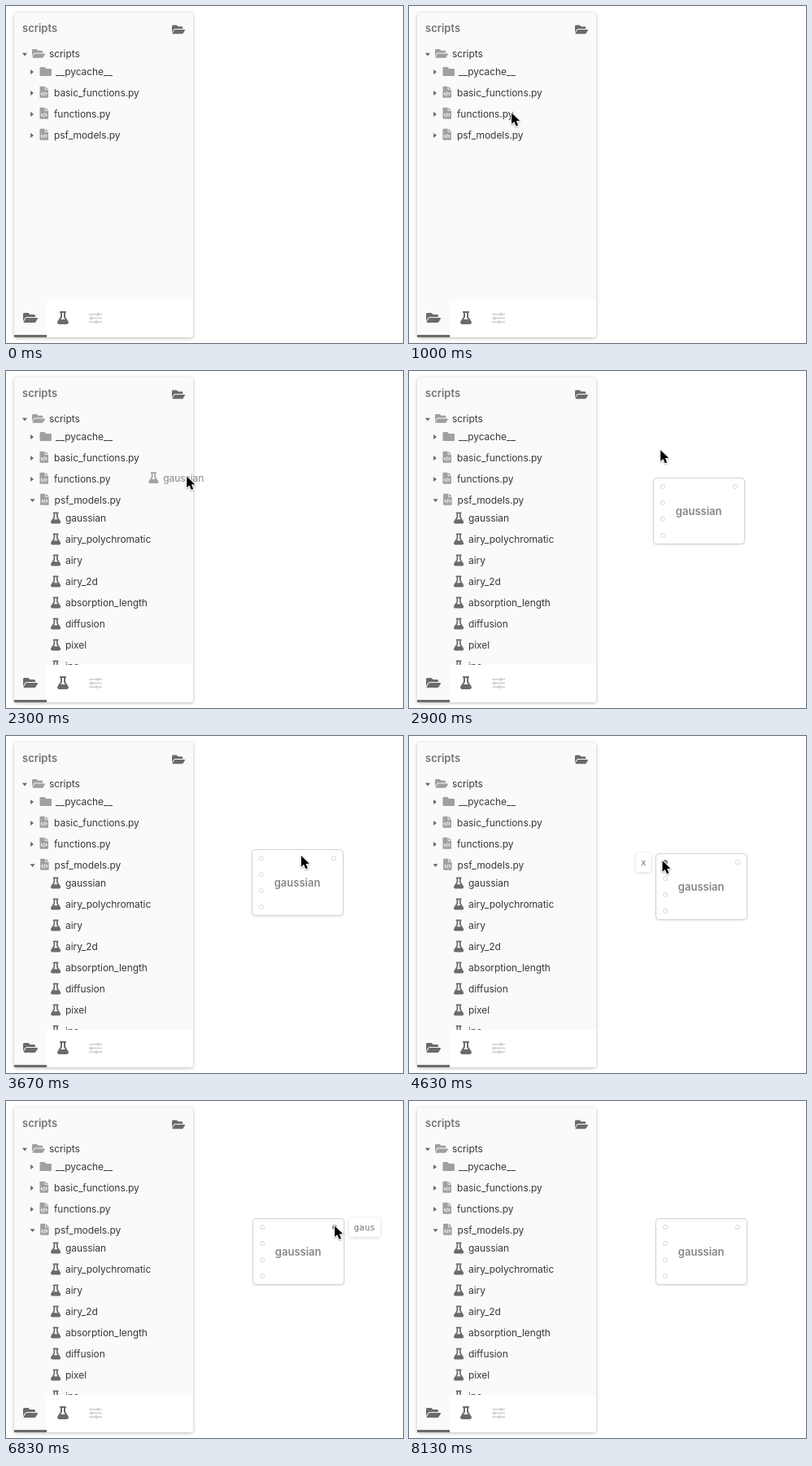
An HTML page with a canvas for the animation above (9030 ms loop, 488 px wide and 414 px high).

```html
<!DOCTYPE html>
<html lang="en">
<head>
<meta charset="utf-8">
<title>Script browser</title>
<style>
html, body { margin: 0; width: 100%; height: 100%; overflow: hidden; background: #fff; }
canvas { display: block; width: 488px; height: 414px; }
</style>
</head>
<body>
<canvas id="stage"></canvas>
<script>
const W = 488, H = 414, LOOP = 9030;
const canvas = document.getElementById('stage');
const ctx = canvas.getContext('2d');
const dpr = window.devicePixelRatio || 1;
canvas.width = W * dpr;
canvas.height = H * dpr;

const SANS = 'Inter, "Open Sans", sans-serif';
const MONO = '"DejaVu Sans Mono", monospace';
const DARK = '#6b6b6b', SOFT = '#a0a0a0', TEXT = '#383838', PANEL = '#fafafa';

const icons = {
  open: new Path2D('M573 292 500 416Q482 448 445 448H45C26 448 15 428 24 412L97 288Q115 256 152 256H552C570 256 582 276 573 292ZM152 224H480V176Q480 128 432 128H272L208 64H48Q0 64 0 112V390L69 272Q98 224 152 224Z'),
  folder: new Path2D('M464 128H272L208 64H48Q0 64 0 112V400Q0 448 48 448H464Q512 448 512 400V176Q512 128 464 128Z'),
  file: new Path2D('M0 24Q0 0 24 0H224V136Q224 160 248 160H384V488Q384 512 360 512H24Q0 512 0 488ZM256 0 384 128H256Z'),
  code: new Path2D('M125 270 65 335 125 400M259 270 319 335 259 400M217 245 167 425'),
  flask: new Path2D('M437 403 320 215V64H328Q352 64 352 40V24Q352 0 328 0H120Q96 0 96 24V40Q96 64 120 64H128V215L11 403C-18 450 16 512 72 512H376C432 512 466 450 437 403ZM138 320 186 242Q192 233 192 222V64H256V222Q256 233 262 242L310 320Z')
};
const arrow = new Path2D('M0 0V13.6L3.2 10.8 5.5 16.2 8 15.2 5.7 9.9 10 9.6Z');

// Pointer path: time, x, y
const path = [
  [440, 284, 0], [1100, 100, 153],
  [1600, 100, 153], [1870, 102, 179],
  [2040, 102, 179], [2070, 115, 177], [2500, 296, 97],
  [2870, 296, 97], [2900, 309, 97], [3300, 361, 139],
  [3540, 361, 139], [3770, 364, 152],
  [3940, 364, 152], [4330, 311, 153],
  [4600, 311, 153], [4630, 311.5, 153], [4830, 313, 174],
  [5040, 313, 174], [5370, 314, 197],
  [5540, 314, 197], [5770, 314, 212.5],
  [6140, 314, 212.5], [6830, 404, 153.5],
  [7400, 404, 153.5], [7730, 447, 82]
];
const EXPAND = 1330, GRAB = 2085, DROP = 2500;
const items = ['gaussian', 'airy_polychromatic', 'airy', 'airy_2d', 'absorption_length', 'diffusion', 'pixel', 'ipc'];
const ports = [
  [12, 11, 'x'], [12, 31, 'A'], [12, 51, 'mu'], [12, 71, 'sigma'], [101, 11, 'gaus']
];

function ease(p) {
  return p + 0.12 * Math.sin(Math.PI * p) * (1 - p);
}

function progress(t, a, b) {
  return ease(Math.min(1, Math.max(0, (t - a) / (b - a))));
}

function pointerAt(t) {
  if (t < 470 || t >= 8130) return null;
  if (t >= 8100) return { x: 420, y: 41 };
  let i = 0;
  while (i < path.length - 2 && t > path[i + 1][0]) i++;
  const [t0, x0, y0] = path[i], [t1, x1, y1] = path[i + 1];
  const p = progress(t, t0, t1);
  return { x: x0 + (x1 - x0) * p, y: y0 + (y1 - y0) * p };
}

function text(str, x, y, font, color, align = 'left') {
  ctx.font = font;
  ctx.fillStyle = color;
  ctx.textAlign = align;
  ctx.fillText(str, x, y);
}

function row(str, x, y) {
  ctx.letterSpacing = '-0.07px';
  text(str, x, y, '12px ' + SANS, TEXT);
  ctx.letterSpacing = '0px';
}

function icon(name, x, y, scale, color) {
  ctx.save();
  ctx.translate(x, y);
  ctx.scale(scale, scale);
  ctx.fillStyle = color;
  ctx.fill(icons[name], 'evenodd');
  if (name === 'file') {
    ctx.strokeStyle = PANEL;
    ctx.lineWidth = 38;
    ctx.stroke(icons.code);
  }
  ctx.restore();
}

function caret(x, y, down) {
  ctx.save();
  ctx.translate(x, y);
  if (down) ctx.rotate(Math.PI / 2);
  ctx.fillStyle = '#666';
  ctx.beginPath();
  ctx.moveTo(-1.8, -3);
  ctx.lineTo(2, 0);
  ctx.lineTo(-1.8, 3);
  ctx.fill();
  ctx.restore();
}

function card(x, y, w, h, r, fill, shade, blur) {
  ctx.save();
  ctx.shadowColor = `rgba(0,0,0,${shade})`;
  ctx.shadowBlur = blur * dpr;
  ctx.shadowOffsetY = dpr;
  ctx.fillStyle = fill;
  ctx.beginPath();
  ctx.roundRect(x, y, w, h, r);
  ctx.fill();
  ctx.restore();
}

function item(str, x, y) {
  icon('flask', x, y - 11.5, 14 / 512, DARK);
  row(str, x + 18, y);
}

function tree(t) {
  const open = t >= EXPAND;
  ctx.save();
  ctx.beginPath();
  ctx.rect(10, 8, 220, 353);
  ctx.clip();
  caret(23, 59.5, true);
  icon('open', 32, 51.3, 16 / 576, SOFT);
  row('scripts', 53, 63);
  caret(32, 81, false);
  icon('folder', 41.5, 73.3, 14.5 / 512, SOFT);
  row('__pycache__', 61, 85);
  ['basic_functions.py', 'functions.py', 'psf_models.py'].forEach((name, i) => {
    const y = 111 + i * 26, shown = open && i === 2, dx = shown ? 0.6 : 0;
    caret(32 + dx, y - 4, shown);
    icon('file', 41.5 + dx, y - 12.3, 14 / 512, SOFT);
    row(name, 59 + dx, y);
  });
  if (open) items.forEach((name, i) => item(name, 55, 185 + i * 26));
  ctx.restore();
}

function footer() {
  ctx.fillStyle = '#fff';
  ctx.beginPath();
  ctx.roundRect(50, 361, 180, 46, [0, 0, 4, 0]);
  ctx.fill();
  ctx.fillStyle = DARK;
  ctx.fillRect(10, 404, 40, 3);
  icon('open', 21, 375, 18 / 576, DARK);
  icon('flask', 63, 375, 16 / 512, DARK);
  ctx.fillStyle = '#d0d0d0';
  [113, 105, 111].forEach((x, i) => {
    const y = 378 + i * 4.7;
    ctx.fillRect(102, y, 16, 1.6);
    ctx.fillRect(x - 1, y - 1.2, 2.2, 4);
  });
}

function panel(t) {
  card(10, 8, 220, 399, 4, PANEL, 0.28, 4);
  text('scripts', 20, 32, '600 13px ' + SANS, '#757575');
  icon('open', 204, 21.8, 16 / 576, DARK);
  tree(t);
  footer();
}

function tip(str, x, y, left) {
  ctx.font = '11px ' + MONO;
  const w = ctx.measureText(str).width + 12;
  const bx = left ? x - 17.5 - w : x + 17.5;
  card(bx, y - 12, w, 24, 4, '#fff', 0.16, 4);
  text(str, bx + 6, y + 3.5, '11px ' + MONO, '#777');
}

function node(t, mouse) {
  const p = progress(t, 3540, 3770);
  const x = 300 + 3 * p, y = 131 + 13 * p;
  card(x + 0.5, y + 0.5, 112, 81, 4, '#fff', 0.13, 3);
  ctx.strokeStyle = '#d3d3d3';
  ctx.lineWidth = 1;
  ctx.beginPath();
  ctx.roundRect(x + 0.5, y + 0.5, 112, 81, 4);
  ctx.stroke();
  text('gaussian', x + 56.2, y + 46, '600 13px ' + SANS, '#85878b', 'center');
  for (const [dx, dy, name] of ports) {
    const px = x + dx, py = y + dy;
    const hot = mouse && Math.hypot(mouse.x - px, mouse.y - py) < 4.8;
    ctx.beginPath();
    ctx.arc(px, py, 2.6, 0, 2 * Math.PI);
    ctx.fillStyle = hot ? '#888' : '#fff';
    ctx.fill();
    ctx.strokeStyle = hot ? '#888' : '#dadada';
    ctx.stroke();
    if (hot) tip(name, px, py, dx < 50);
  }
}

function pointer({ x, y }) {
  ctx.save();
  ctx.translate(x, y);
  ctx.lineJoin = 'round';
  ctx.lineWidth = 2;
  ctx.strokeStyle = '#fff';
  ctx.shadowColor = 'rgba(0,0,0,.3)';
  ctx.shadowBlur = 2 * dpr;
  ctx.shadowOffsetY = dpr;
  ctx.stroke(arrow);
  ctx.shadowColor = 'transparent';
  ctx.fillStyle = '#000';
  ctx.fill(arrow);
  ctx.restore();
}

function draw(t) {
  const mouse = pointerAt(t);
  ctx.setTransform(dpr, 0, 0, dpr, 0, 0);
  ctx.fillStyle = '#fff';
  ctx.fillRect(0, 0, W, H);
  panel(t);
  if (t >= DROP) node(t, mouse);
  if (t >= GRAB && t < DROP) {
    ctx.globalAlpha = 0.6;
    item(items[0], mouse.x - 47, mouse.y + 6);
    ctx.globalAlpha = 1;
  }
  if (mouse) pointer(mouse);
}

const start = performance.now();
function tick() {
  draw((performance.now() - start) % LOOP);
  requestAnimationFrame(tick);
}
tick();
</script>
</body>
</html>
```
